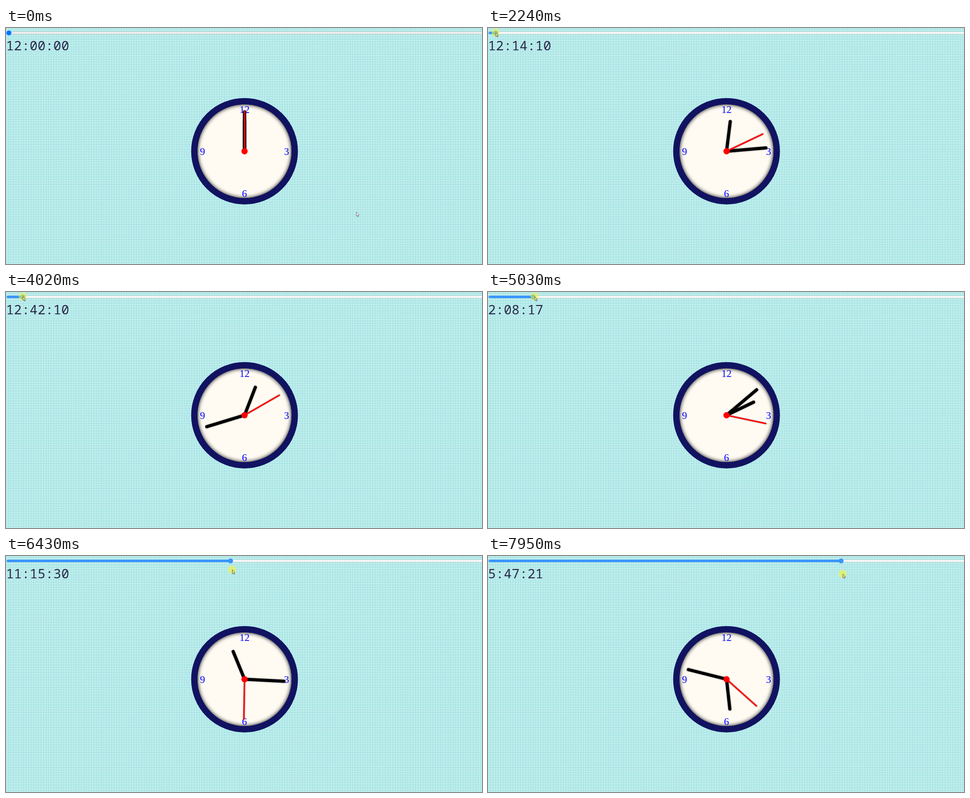
These frames come from a looping animation (1061 by 528 pixels, 8 s). An HTML page with a canvas:

```html
<!DOCTYPE html>
<html lang="en">
<head>
<meta charset="utf-8">
<title>Slider clock</title>
<style>
  html, body { margin: 0; width: 100%; height: 100%; overflow: hidden; background: #a9e6e5; }
  canvas { display: block; }
</style>
</head>
<body>
<canvas id="stage" width="1061" height="528"></canvas>
<script>
const ctx = document.getElementById('stage').getContext('2d');
const W = 1061, H = 528, LOOP = 8000, STEP = 50, PRESS = 1570, GLIDE = 4270;
const CX = 531.7, CY = 275.7, TAU = Math.PI * 2;

// Drag of the slider: [time in ms, clock seconds]
const DRAG = [
  [PRESS, 0], [2920, 1768], [3300, 2268], [3820, 2268], [4020, 2530], [GLIDE, 2530],
  [5020, 7697], [5820, 27643], [7070, 52781.9], [7620, 60850], [7670, 60850], [7920, 64041.98]
];

function ease(t, from, to) {
  const p = Math.min(1, Math.max(0, (t - from) / (to - from)));
  return p * p * (3 - 2 * p);
}

// Monotone cubic interpolation through the drag points
function secondsAt(t) {
  const last = DRAG.length - 1;
  if (t <= DRAG[0][0]) return 0;
  if (t >= DRAG[last][0]) return DRAG[last][1];
  const slope = i => {
    const j = Math.min(last - 1, Math.max(0, i));
    return (DRAG[j + 1][1] - DRAG[j][1]) / (DRAG[j + 1][0] - DRAG[j][0]);
  };
  const tangent = i => {
    const a = slope(i - 1), b = slope(i);
    return a * b > 0 ? 2 * a * b / (a + b) : 0;
  };
  const i = DRAG.findIndex(k => k[0] > t) - 1;
  const [t0, s0] = DRAG[i], [t1, s1] = DRAG[i + 1];
  const d = t1 - t0, p = (t - t0) / d, q = 1 - p;
  return q * q * ((1 + 2 * p) * s0 + p * d * tangent(i))
       + p * p * ((1 + 2 * q) * s1 - q * d * tangent(i + 1));
}

function pointerAt(t, thumb) {
  if (t < PRESS) {
    const go = ease(t, 30, 870);
    return [781 - 776 * go, 412 - 426 * go + 23 * ease(t, 1000, 1400)];
  }
  const x = thumb + 0.5 + 3.5 * ease(t, GLIDE, 5020);
  return [x, 10 + 33 * ease(t, 5600, 7000) - 3 * ease(t, 7100, 7900)];
}

function disc(x, y, r, fill) {
  ctx.fillStyle = fill;
  ctx.beginPath();
  ctx.arc(x, y, r, 0, TAU);
  ctx.fill();
}

function pill(x, y, w, h, fill) {
  ctx.fillStyle = fill;
  ctx.beginPath();
  ctx.roundRect(x, y, w, h, h / 2);
  ctx.fill();
}

function background() {
  ctx.fillStyle = '#a9e6e5';
  ctx.fillRect(0, 0, W, H);
  ctx.fillStyle = 'rgba(255,255,255,.42)';
  for (let x = 2.1; x < W; x += 5.6) ctx.fillRect(x, 0, 1, H);
  for (let y = -0.45; y < H; y += 5.6) ctx.fillRect(0, y, W, 1);
}

function slider(thumb, hover, active) {
  const accent = active ? '#3793ff' : hover ? '#005cc8' : '#0075ff';
  pill(1.4, 8.2, W + 5, 5.6, active ? '#c9cccc' : '#b8b8b8');
  pill(2.1, 8.9, W + 4, 4.2, active ? '#f9f9f9' : hover ? '#e5e5e5' : '#f1f1f1');
  pill(1.4, 8.2, thumb, 5.6, accent);
  disc(thumb, 11, 5.6, accent);
}

function hand(turns, length, width, color) {
  ctx.save();
  ctx.translate(CX, CY);
  ctx.rotate(turns * TAU);
  ctx.shadowColor = 'rgba(0,0,0,.45)';
  ctx.shadowBlur = 3;
  ctx.strokeStyle = color;
  ctx.lineWidth = width;
  ctx.lineCap = 'round';
  ctx.beginPath();
  ctx.moveTo(0, 0);
  ctx.lineTo(0, -length);
  ctx.stroke();
  ctx.restore();
}

function face() {
  disc(CX, CY, 105.5, '#fffbf3');
  ctx.save();
  ctx.beginPath();
  ctx.arc(CX, CY, 105.5, 0, TAU);
  ctx.clip();
  ctx.shadowColor = '#000';
  ctx.shadowBlur = 10;
  ctx.lineWidth = 30;
  ctx.beginPath();
  ctx.arc(CX, CY, 120, 0, TAU);
  ctx.stroke();
  ctx.restore();

  ctx.beginPath();
  ctx.arc(CX, CY, 112, 0, TAU);
  ctx.strokeStyle = '#111361';
  ctx.lineWidth = 14;
  ctx.stroke();

  ctx.fillStyle = '#00f';
  ctx.font = '22.4px "Liberation Serif", serif';
  ctx.textAlign = 'center';
  for (let hour = 3; hour <= 12; hour += 3) {
    const a = hour / 12 * TAU;
    ctx.fillText(hour, CX + 93.7 * Math.sin(a), CY + 8.3 - 93.7 * Math.cos(a));
  }
}

function clock(s) {
  face();
  hand(s / 43200, 67, 7, '#000');
  hand(s / 3600, 88, 7, '#000');
  hand(s / 60, 89.5, 3.2, '#f00');
  disc(CX, CY, 7, '#f00');
}

function readout(s) {
  const two = n => String(Math.floor(n) % 60).padStart(2, '0');
  const hour = Math.floor(s / 3600) % 12 || 12;
  ctx.fillStyle = '#2b294c';
  ctx.font = '29.33px "Noto Sans Mono", monospace';
  ctx.textAlign = 'left';
  ctx.fillText(`${hour}:${two(s / 60)}:${two(s)}`, 0, 50);
}

function pointer(x, y, active) {
  ctx.save();
  ctx.translate(x, y);
  if (active) disc(-0.5, 0, 9, 'rgba(250,245,40,.55)');
  ctx.beginPath();
  [[0, 0], [0, 9], [2, 7.3], [3.5, 10.5], [4.8, 10], [3.5, 6.8], [6, 6.5]]
    .forEach(p => ctx.lineTo(...p));
  ctx.closePath();
  ctx.fillStyle = active ? '#eeeb8c' : '#fff';
  ctx.fill();
  ctx.strokeStyle = '#444';
  ctx.lineWidth = 0.8;
  ctx.stroke();
  ctx.restore();
}

function frame(now) {
  // The pose advances in discrete steps, like a screen recording
  const t = Math.floor((now % LOOP - 20) / STEP) * STEP + 20;
  const s = secondsAt(t);
  const thumb = 6.5 + s / 86400 * 1053;
  const [x, y] = pointerAt(t, thumb);
  const active = t >= PRESS;

  background();
  slider(thumb, y > 2 && y < 20, active);
  readout(s);
  clock(s);
  pointer(x, y, active);
  requestAnimationFrame(frame);
}
requestAnimationFrame(frame);
</script>
</body>
</html>
```
